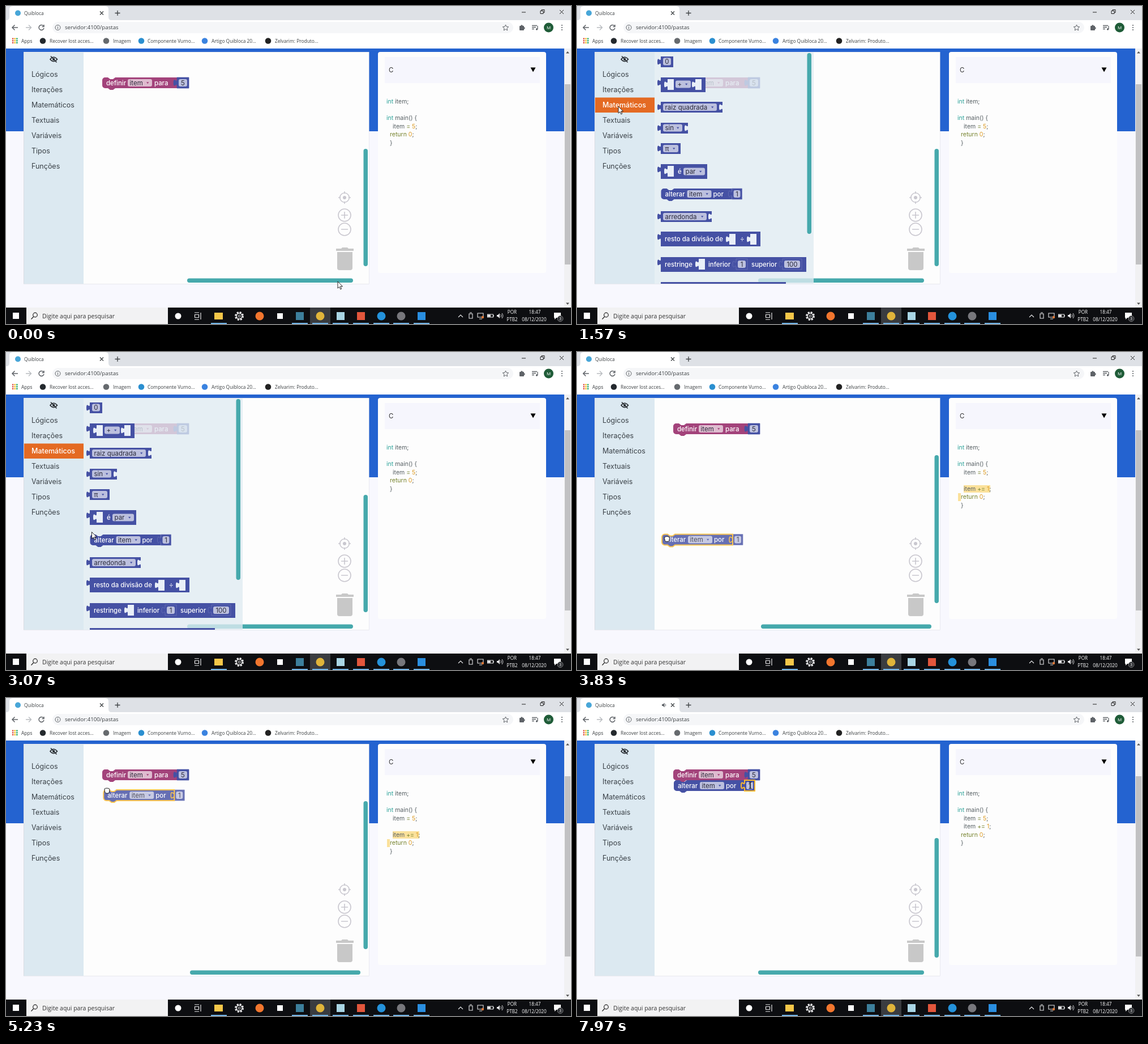
Animation of 998 by 561 pixels, one loop 8000 ms. Source, as an HTML page:

```html
<!DOCTYPE html>
<html lang="pt">
<head>
<meta charset="utf-8">
<title>Blocos</title>
<style>
html, body { margin: 0; width: 100%; height: 100%; overflow: hidden; }
svg { display: block; width: 100vw; height: 100vh; }
text { font-family: "Open Sans", "Noto Sans", sans-serif; white-space: pre; }
.app { font-family: Inter, "Open Sans", sans-serif; }
</style>
</head>
<body>
<svg id="stage" viewBox="0 0 998 561"></svg>
<script>
const LOOP = 8000;
const OPEN = 1330, DRAG = 3600, DROP = 5950, EDIT = 7700;
const MATH = '#4551a4', PINK = '#a3437b', TEAL = '#46a9ac', GOLD = '#fcb92c';
const PAPER = '#fdfdfd', MIST = '#e0ecf3', SOCKET = '#e9eff8';

// Basic shapes
const rect = (x, y, w, h, fill, extra = '') => `<rect x="${x}" y="${y}" width="${w}" height="${h}" fill="${fill}" ${extra}/>`;
const dot = (x, y, r, fill, extra = '') => `<circle cx="${x}" cy="${y}" r="${r}" fill="${fill}" ${extra}/>`;
const shape = (d, fill, extra = '') => `<path d="${d}" fill="${fill}" ${extra}/>`;
const line = (d, color, width = 1) => shape(d, 'none', `stroke="${color}" stroke-width="${width}"`);
const text = (x, cy, str, size, fill, extra = '') =>
  `<text x="${x}" y="${cy + size * .36}" font-size="${size}" fill="${fill}" ${extra}>${str}</text>`;
const appText = (x, cy, str, size, fill, extra = '') => text(x, cy, str, size, fill, 'class="app" ' + extra);

// Blocks
const stmtPath = (x, y, w, h) =>
  `M${x} ${y + 5}a5 5 0 0 1 5-5h5l4 3h5l4-3H${x + w}v${h}H${x + 23}l-4 3h-5l-4-3H${x + 5}a5 5 0 0 1-5-5z`;
const valuePath = (x, y, w, h) =>
  `M${x} ${y}h${w}v${h}H${x}V${y + 15}c0-7.5-6 6-6-5.6s6 1.9 6-5.6z`;
const value = (y, w, h = 19) => shape(valuePath(148, y, w, h), MATH);
const hole = (x, y, w = 11) => shape(valuePath(x, y, w, 19), SOCKET);
const label = (x, cy, str) => appText(x, cy, str, 11.4, '#fff', 'font-weight="500"');
const fieldBox = (x, cy, w) => rect(x, cy - 6.5, w, 13, '#fff', 'opacity=".64" rx="3"');
const number = (x, cy, w, str) => fieldBox(x, cy, w) + appText(x + w / 2, cy, str, 11.5, '#2c2c3c', 'text-anchor="middle"');
const drop = (x, cy, w, str, color = MATH) => fieldBox(x, cy, w) + appText(x + 3.5, cy, str, 11.5, '#2c2c3c') +
  shape(`M${x + w - 10} ${cy - 1.2}h4.4l-2.2 3z`, color);
const shadowNumber = (x, y, w, str, edge = '#7079bb') =>
  shape(valuePath(x, y, w, 19), MATH, `stroke="${edge}" stroke-width=".7"`) + number(x + 3, y + 9.5, w - 6, str);

const setBlock = () => shape(stmtPath(170, 126, 132, 19), PINK) + label(177, 135.5, 'definir') +
  drop(215, 135.5, 43, 'item', PINK) + label(262, 135.5, 'para') + shadowNumber(302, 126, 21, '5', MATH);

function changeBlock(x, y, selected = '') {
  const cy = y + 9.5, body = stmtPath(x, y, 125, 19);
  const outlines = {
    block: line(body, GOLD, 2) + line(`M${x + 125} ${y + 4}c0 7.5-6-6-6 5.6s6-1.9 6 5.6`, GOLD, 1.5),
    number: line(valuePath(x + 125, y, 18, 19), GOLD, 2)
  };
  return shape(body, MATH) + label(x + 7, cy, 'alterar') + drop(x + 46, cy, 43, 'item') +
    label(x + 92, cy, 'por') + shadowNumber(x + 125, y, 18, '1') + (outlines[selected] || '');
}

const vBar = (x, top, bottom) => rect(x, top, 7.5, bottom - top, TEAL, 'rx="3.7"');
const hBar = (left, right) => rect(left, 480.5, right - left, 7.5, TEAL, 'rx="3.7"');

const flyout = rect(137, 82, 281, 408, MIST, 'opacity=".78"') +
  value(89, 22) + number(152, 98, 14, '0') +
  value(126, 79, 26) + hole(160, 129) + drop(174, 138, 27, '+') + hole(209, 129) +
  value(169, 109) + drop(152, 178.5, 95, 'raiz quadrada') + hole(257, 169, 0) +
  value(206, 48) + drop(152, 215, 34, 'sin') + hole(196, 206, 0) +
  value(242, 35) + drop(152, 251.5, 27, 'π') +
  value(279, 82, 26) + hole(160, 282) + label(178, 292, 'é') + drop(188, 292, 38, 'par') +
  changeBlock(148.5, 322) +
  value(362, 90) + drop(152, 371.5, 77, 'arredonda') + hole(238, 362, 0) +
  value(398, 176, 26) + label(155, 411, 'resto da divisão de') + hole(269, 402) + label(288, 411, '÷') + hole(306, 402) +
  value(443, 257, 26) + label(155, 455.5, 'restringe') + hole(215, 446) + label(232, 455.5, 'inferior') +
  shadowNumber(281, 446, 20, '1') + label(308, 455.5, 'superior') + shadowNumber(363, 446, 34, '100') +
  rect(148, 487, 221, 3, MATH) + vBar(406.5, 83, 402);

// Browser window, page and taskbar
function browser() {
  const grey = '#5f6368', ink = '#3c4043';
  const bookmarks = [
    [27, 'Apps'], [77, 'Recover lost acces...', 65, '#24292e'], [189, 'Imagem', 177, '#666a6e'],
    [250, 'Componente Vurno...', 239, '#2b8fd0'], [363, 'Artigo Quibloca 20...', 351, '#3b83e0'],
    [475, 'Zelvarim: Produto...', 463, '#222']];
  let out = rect(0, 0, 998, 26, '#dee1e6') + shape('M1 25q5 0 5-6V6q0-6 6-6h163q6 0 6 6v13q0 6 5 6z', '#fff') +
    rect(0, 25, 998, 50, '#fff') + rect(82, 28, 814, 20, '#f5f6f8', 'rx="10"') +
    dot(21, 12.5, 5, '#48a6d8') + text(32, 12.5, 'Quibloca', 8.4, ink) +
    line('M166 9.5l6 6m0-6l-6 6M197 8v9m-4.5-4.5h9', ink, 1.3) +
    line('M911 11h7M944 8.5h5v5h-5zM946 8.5v-2h5v5h-2M978 7l7 7m0-7l-7 7', '#222') +
    line('M21 38h-10m4.5-4.5l-4.5 4.5 4.5 4.5', grey, 1.5) +
    line('M35 38h9m-4-4.5l4.5 4.5-4.5 4.5', '#b9bcc0', 1.4) +
    line('M66 35a4.5 4.5 0 1 0 1 4M67 33v3.5h-3.5', grey, 1.5) +
    dot(91.5, 38, 4.5, 'none', `stroke="${grey}"`) + line('M91.5 37v3.5m0-5.5v1', grey, 1.1) +
    text(104, 38, 'servidor:4100/pastas', 9.7, ink) +
    line('M882.5 33l1.5 3.4 3.7.4-2.8 2.5.8 3.7-3.2-1.9-3.2 1.9.8-3.7-2.8-2.5 3.7-.4z', grey) +
    rect(907, 35, 8, 8, grey, 'rx="1"') + dot(911, 35, 1.7, grey) + dot(915, 39, 1.7, grey) +
    line('M929 34.5h9m-9 3h7m-7 3h4M939 35v6', grey, 1.3) + dot(937.5, 41, 1.7, grey) +
    dot(958.5, 38, 8.5, '#1f5c38') + text(958.5, 38, 'M', 8, '#fff', 'text-anchor="middle"') +
    [34, 38, 42].map(y => dot(982, y, 1.1, grey)).join('');
  const appColors = ['#db4437', '#f4b400', '#0f9d58'];
  for (let i = 0; i < 9; i++) out += rect(11 + i % 3 * 3.6, 56.5 + (i / 3 | 0) * 3.6, 2.3, 2.3, appColors[i % 3]);
  for (const [x, name, iconX, color] of bookmarks)
    out += text(x, 61.5, name, 8.4, ink) + (color ? dot(iconX, 61.5, 5.3, color) : '');
  return out;
}

function page() {
  const soft = 'stroke="#c9c7cf" stroke-width="1.6"';
  return rect(0, 75, 998, 457, '#f8f8fe') + rect(0, 75, 986, 146, '#2463d0') +
    rect(986, 75, 12, 457, '#f1f1f3') + rect(987, 138, 10, 318, '#c1c1c3') +
    shape('M989 83.5h6l-3-3.5zM989 523.5h6l-3 3.5z', '#555') +
    rect(31, 81, 610.5, 409.5, '#d9dbe2') + rect(32, 81.5, 609, 408.5, PAPER) + rect(32, 82, 105, 408, '#dce9f1') +
    rect(657, 81, 297, 390, PAPER, 'rx="4"') + rect(669, 90, 274, 46, '#f6f6fd') +
    appText(676, 112.5, 'C', 11.5, '#333') + shape('M926.5 108.5h9l-4.5 8z', '#000') +
    shape('M78 94q6-7.5 12.5 0q-6.5 7.5-12.5 0z', 'none', 'stroke="#2b3035" stroke-width="1.7"') +
    dot(84.2, 94, 2.2, '#2b3035') + line('M79 88.5l10.5 11', '#2b3035', 1.6) +
    dot(598, 338, 8.2, 'none', soft) + dot(598, 338, 3, '#c9c7cf') +
    line('M598 327v4m0 14v4M587 338h4m14 0h4', '#c9c7cf', 1.6) +
    dot(598, 369, 11, 'none', soft) + dot(598, 394, 11, 'none', soft) +
    line('M598 363v12m-6-6h12M592 394h12', '#c9c7cf', 1.6) +
    shape('M583 432v-4h9l2-2h9l2 2h9v4zM585 434h27v28q0 4-4 4h-19q-4 0-4-4z', '#c8c8c8');
}

function taskbar() {
  const pale = '#e8e8ea', centered = 'text-anchor="middle"';
  const icons = [
    [448, '#f2762e'], [519, '#3d7f9c', 1, 1], [555, '#e0b43a', 1], [591, '#a9d5e4', 1, 1],
    [627, '#e2563c', 1, 1], [663, '#2492db', 1], [698, '#77777c', 1], [734, '#2a8ee0', 1, 1]];
  let out = rect(0, 532, 998, 29, '#0d0e11') + rect(36, 532, 250, 29, '#f2f2f3') + rect(537, 532, 36, 29, '#3a3c40') +
    rect(12, 541, 11, 11, '#fff') + dot(51.5, 545, 3.8, 'none', 'stroke="#222" stroke-width="1.2"') +
    line('M48.7 548l-4.2 4.5', '#222', 1.2) + text(64, 547, 'Digite aqui para pesquisar', 10.5, '#333') +
    dot(304, 547, 5.5, '#fff') + line('M333.5 544.5h7v5h-7zM333 541h8M333 553h8M344 541v12', pale, 1.2) +
    rect(368, 541, 15, 12, '#f5c749') + rect(362, 559, 28, 2, '#76b9ed') +
    dot(412, 547, 6.5, 'none', `stroke="${pale}" stroke-width="3" stroke-dasharray="3 2.1"`) +
    dot(412, 547, 5, 'none', `stroke="${pale}" stroke-width="1.4"`) + dot(412, 547, 2, 'none', `stroke="${pale}"`) +
    rect(479, 542, 10, 10, '#fff');
  for (const [x, color, running, square] of icons)
    out += (square ? rect(x - 7, 540, 14, 14, color) : dot(x, 547, 7.5, color)) +
      (running ? rect(x - 14, 559, 28, 2, '#76b9ed') : '');
  return out +
    line('M799 549l4-4 4 4M818 543h6v8h-6zM819 541h4M833 542h10v7h-10zM836 552h5M850.5 544h10v5h-10zM861.5 545.5v2', pale, 1.1) +
    rect(851, 544.5, 5, 4, pale) + dot(842, 549, 2.2, '#e07a3a') +
    shape('M867 545h2l3-3v9l-3-3h-2z', pale) + line('M874 544q2 2.5 0 5m2-7q3.5 4.5 0 9', pale) +
    text(894, 540.5, 'POR', 8.2, '#fff', centered) + text(894, 553, 'PTB2', 8.2, '#fff', centered) +
    text(934, 540.5, '18:47', 8.2, '#fff', centered) + text(933, 553, '08/12/2020', 8.2, '#fff', centered) +
    shape('M968 541h12v9h-8l-3 3v-3h-1z', '#fff') + dot(979, 551.5, 5, '#2b2d31', 'stroke="#aaa" stroke-width=".7"') +
    text(979, 551.5, '3', 7, '#fff', centered);
}

// Motion: [time, x, y] stops, eased between
const pointerPath = [
  [0, 586, 486], [770, 44, 207], [1100, 70, 176], [1550, 73, 177], [2170, 93, 223], [2350, 95, 226],
  [3250, 158, 328], [3830, 159, 330], [4630, 176, 218], [5450, 179, 152], [6000, 179, 152],
  [6370, 179, 243], [6650, 180, 244], [7400, 305, 155], [8000, 306, 154]];
const blockPath = [[DRAG, 148.5, 322], [3830, 150, 321.5], [4630, 169, 218.5], [5450, 173, 150], [DROP, 173, 150]];

function along(stops, t) {
  const i = Math.max(1, stops.findIndex(s => s[0] >= t));
  const [t0, x0, y0] = stops[i - 1], [t1, x1, y1] = stops[i];
  const p = Math.min(1, Math.max(0, (t - t0) / (t1 - t0))), e = p * p * (3 - 2 * p);
  return [x0 + (x1 - x0) * e, y0 + (y1 - y0) * e];
}

const pointers = {
  arrow: shape('M0 0v12l2.8-2.6 2 4.4 1.9-.9-2-4.2h3.8z', '#fff', 'stroke="#111" stroke-width=".9"'),
  hand: shape('M-4.5-1.5q-.3-3 1.7-2.3q1-1.7 2.7-.4q1.8-1.2 2.6.4q2.2-.2 2 2l-.6 4q-.4 2.3-2 2.3h-3.6q-1.3-.5-2-2z',
    '#fff', 'stroke="#111"'),
  beam: line('M-2.5-5.5h5M0-5.5v11M-2.5 5.5h5', '#111', 1.2)
};

const menu = ['Lógicos', 'Iterações', 'Matemáticos', 'Textuais', 'Variáveis', 'Tipos', 'Funções'];
function sidebar(x, y, flyoutOpen, arrow) {
  const hovered = arrow && x >= 32 && x < 137 ? Math.floor((y - 107) / 27) : -1;
  return menu.map((name, i) => {
    const chosen = flyoutOpen && i === 2, fill = chosen ? '#e46a23' : i === hovered ? '#fcc92e' : '';
    return (fill ? rect(32, 107.5 + 27 * i, 105, 26.5, fill) : '') +
      appText(45, 120.5 + 27 * i, name, 12.5, chosen ? '#fff' : '#3a4147', chosen ? 'font-weight="500"' : '');
  }).join('');
}

function code(dragging, placed) {
  const paint = (str, color) => `<tspan fill="${color}">${str}</tspan>`;
  const row = (n, x, str) => appText(x, 168 + 14.6 * n, str, 10.5, '#565f63');
  const int = paint('int', '#2aa198'), num = n => paint(n, '#dc9a22'), olive = s => paint(s, '#75822c');
  const extra = dragging ? 2 : placed ? 1 : 0;
  return (dragging ? rect(683, 235, 47, 13, '#fbe19b') + rect(673, 249, 5, 14, '#fbe19b') : '') +
    row(0, 672, int + ' item;') + row(2, 672, int + ' main() {') + row(3, 683, `item ${olive('=')} ${num(5)};`) +
    (extra ? row(3 + extra, 683, `item ${olive('+=')} ${num(1)};`) : '') +
    row(4 + extra, 678, `${olive('return')} ${num(0)};`) + row(5 + extra, 678, '}');
}

function scene(t) {
  const flyoutOpen = t >= OPEN && t < DRAG, dragging = t >= DRAG && t < DROP, placed = t >= DROP;
  const [x, y] = along(pointerPath, t);
  const pointer = t >= 3200 && t < 6050 ? 'hand' : t >= 7330 ? 'beam' : 'arrow';
  const bars = dragging ? hBar(325, 626) + vBar(631.5, 182, 443)
    : hBar(320, 613) + (placed ? vBar(631.5, 247, 458) : vBar(631.5, 252, 459));
  return sidebar(x, y, flyoutOpen, pointer === 'arrow') + setBlock() + bars +
    (placed ? changeBlock(171, 145, t < EDIT ? 'block' : 'number') : '') +
    (flyoutOpen ? flyout : '') +
    (dragging ? `<g opacity=".82">${changeBlock(...along(blockPath, t), 'block')}</g>` : '') +
    code(dragging, placed) +
    (placed ? shape('M150 11h2l2.5-2.5v8l-2.5-2.5h-2z', '#5f6368') + line('M156 10.5q1.5 2 0 4', '#5f6368') : '') +
    `<g transform="translate(${x} ${y})">${pointers[pointer]}</g>`;
}

const stage = document.getElementById('stage');
stage.innerHTML = browser() + page() + taskbar() + '<g id="live"></g>';
const live = document.getElementById('live');
function frame() {
  live.innerHTML = scene(performance.now() % LOOP);
  requestAnimationFrame(frame);
}
frame();
</script>
</body>
</html>
```
